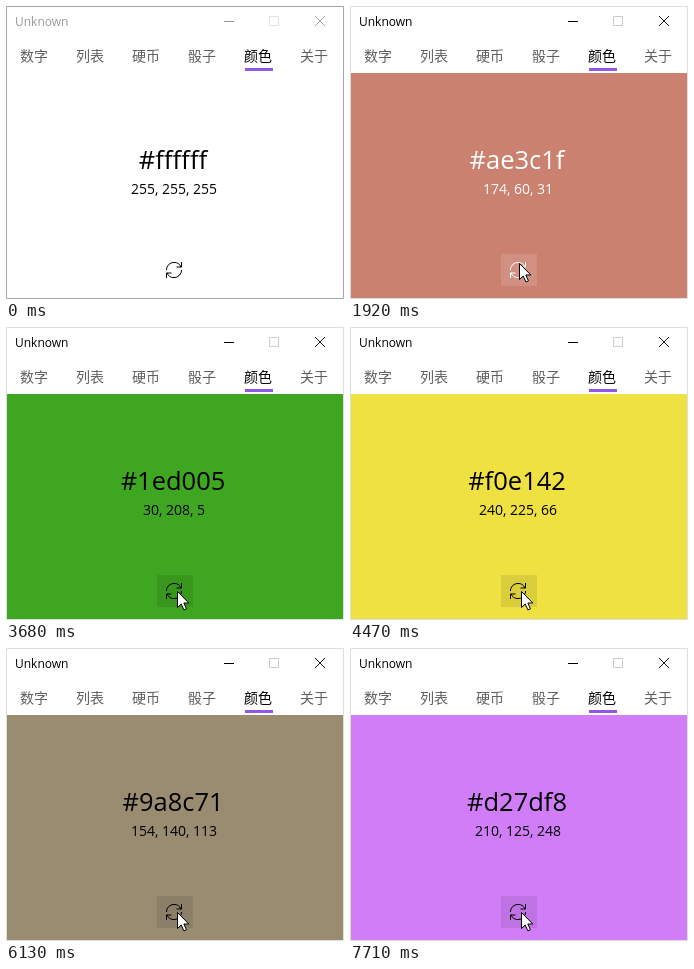
An HTML page with a canvas for the animation above (8000 ms loop, 338 by 293 pixels).

```html
<!DOCTYPE html>
<html lang="zh-CN">
<head>
<meta charset="utf-8">
<title>Unknown</title>
<style>
html, body { margin: 0; width: 100%; height: 100%; overflow: hidden; background: #fff; }
canvas { display: block; width: 338px; height: 293px; }
</style>
</head>
<body>
<canvas id="stage" width="338" height="293"></canvas>
<script>
const ctx = document.getElementById('stage').getContext('2d');
const LOOP = 8000;
const FADE = 180;
const STEP = 43;
const LATIN = '"Open Sans", "Noto Sans", sans-serif';
const CJK = '"Noto Sans CJK SC", "Noto Sans CJK", sans-serif';
const TABS = ['数字', '列表', '硬币', '骰子', '颜色', '关于'];
const ACTIVE_TAB = 4;

// Each pick: mouse press time, time the fade settles, colour, text colour
const PICKS = [
  { press: -1000, settled: -500, hex: '#ffffff', ink: '#000' },
  { press: 1640, settled: 1970, hex: '#ae3c1f', ink: '#fff' },
  { press: 2580, settled: 2940, hex: '#7c5b55', ink: '#fff' },
  { press: 3500, settled: 3730, hex: '#1ed005', ink: '#000' },
  { press: 4190, settled: 4470, hex: '#f0e142', ink: '#000' },
  { press: 4930, settled: 5260, hex: '#eb8a04', ink: '#000' },
  { press: 5800, settled: 6130, hex: '#9a8c71', ink: '#000' },
  { press: 6560, settled: 6870, hex: '#e4d806', ink: '#000' },
  { press: 7380, settled: 7710, hex: '#d27df8', ink: '#000' }
].map(p => ({ ...p, start: p.settled - FADE, rgb: toRgb(p.hex) }));

// Pointer stops: time, x, y, and whether it glides there from the previous stop
const POINTER = [
  { t: 30, x: 338, y: 293 },
  { t: 820, x: 169, y: 255, glide: true },
  { t: 1460, x: 196, y: 274, glide: true },
  { t: 1640, x: 169, y: 257 },
  { t: 2200, x: 172, y: 258 },
  { t: 2580, x: 171, y: 264 }
];

function toRgb(hex) {
  return [1, 3, 5].map(i => parseInt(hex.slice(i, i + 2), 16));
}

function rect(x, y, w, h, color) {
  ctx.fillStyle = color;
  ctx.fillRect(x, y, w, h);
}

function stroke(color, width, build) {
  ctx.strokeStyle = color;
  ctx.lineWidth = width;
  ctx.beginPath();
  build();
  ctx.stroke();
}

function text(str, x, y, size, color, align = 'center', family = LATIN) {
  ctx.font = `${size}px ${family}`;
  ctx.textAlign = align;
  ctx.fillStyle = color;
  ctx.fillText(str, x, y);
}

function polyline(points) {
  points.forEach(([x, y], i) => i ? ctx.lineTo(x, y) : ctx.moveTo(x, y));
}

function pickAt(t) {
  const i = PICKS.findLastIndex(p => t >= p.start);
  const pick = PICKS[i];
  if (t >= pick.settled) return { pick, fill: pick.rgb };
  const k = Math.floor((t - pick.start) / STEP) * STEP / 200;
  const from = PICKS[i - 1].rgb;
  return { pick, fill: from.map((c, j) => Math.round(c + (pick.rgb[j] - c) * k)) };
}

function pointerAt(t) {
  const i = POINTER.findLastIndex(p => t >= p.t);
  if (i < 0) return null;
  const a = POINTER[i], b = POINTER[i + 1];
  if (!b || !b.glide) return a;
  const u = (t - a.t) / (b.t - a.t);
  const k = u * u * (3 - 2 * u);
  return { x: Math.round(a.x + (b.x - a.x) * k), y: Math.round(a.y + (b.y - a.y) * k) };
}

function drawTitleBar(focused) {
  const ink = focused ? '#000' : '#999';
  text('Unknown', 9, 20, 12, ink, 'left');
  rect(218, 15, 10, 1, ink);
  stroke(focused ? '#ccc' : '#e3e3e3', 1, () => ctx.rect(263.5, 10.5, 9, 9));
  stroke(ink, 0.9, () => {
    polyline([[309, 10], [319, 20]]);
    polyline([[319, 10], [309, 20]]);
  });
}

function drawTabs() {
  TABS.forEach((name, i) => {
    text(name, 28 + 56 * i, 55, 14, i === ACTIVE_TAB ? '#000' : '#606060', 'center', CJK);
  });
  rect(239, 62, 28, 3, '#9159e3');
}

function drawSyncIcon(color) {
  for (const turn of [0, Math.PI]) {
    ctx.save();
    ctx.translate(168, 264);
    ctx.rotate(turn);
    stroke(color, 1, () => {
      ctx.arc(0, 0, 7.6, Math.PI, -0.38);
      polyline([[7.5, -8], [7.5, -3], [2.5, -3]]);
    });
    ctx.restore();
  }
}

function drawPointer({ x, y }) {
  ctx.save();
  ctx.translate(x + 0.5, y + 0.5);
  ctx.beginPath();
  polyline([[0, 0], [0, 16], [3.7, 12.5], [6.4, 18.4], [9, 17.3], [6.3, 11.5], [11.3, 11.5]]);
  ctx.closePath();
  ctx.fillStyle = '#fff';
  ctx.fill();
  ctx.strokeStyle = '#000';
  ctx.lineWidth = 1;
  ctx.stroke();
  ctx.restore();
}

function draw(t) {
  const { pick, fill } = pickAt(t);
  const focused = t >= 30;
  const pointer = pointerAt(t);

  rect(0, 0, 338, 293, '#fff');
  drawTitleBar(focused);
  drawTabs();
  rect(1, 67, 336, 225, `rgb(${fill})`);
  stroke(focused ? '#dedede' : '#a6a6a6', 1, () => ctx.rect(0.5, 0.5, 337, 292));

  text(pick.hex, 167, 163, 25.5, pick.ink);
  text(pick.rgb.join(', '), 168, 188, 14, pick.ink);

  if (t >= 780) {
    rect(151, 248, 36, 32, pick.ink === '#fff' ? 'rgba(255,255,255,.12)' : 'rgba(0,0,0,.09)');
  }
  drawSyncIcon(pick.ink);

  if (pointer) drawPointer(pointer);
  if (PICKS.some(p => t >= p.press && t < p.start)) {
    ctx.fillStyle = 'rgba(255,255,0,.5)';
    ctx.beginPath();
    ctx.arc(pointer.x, pointer.y, 12, 0, Math.PI * 2);
    ctx.fill();
  }
}

const began = performance.now();
function tick() {
  draw((performance.now() - began) % LOOP);
  requestAnimationFrame(tick);
}
tick();
</script>
</body>
</html>
```
